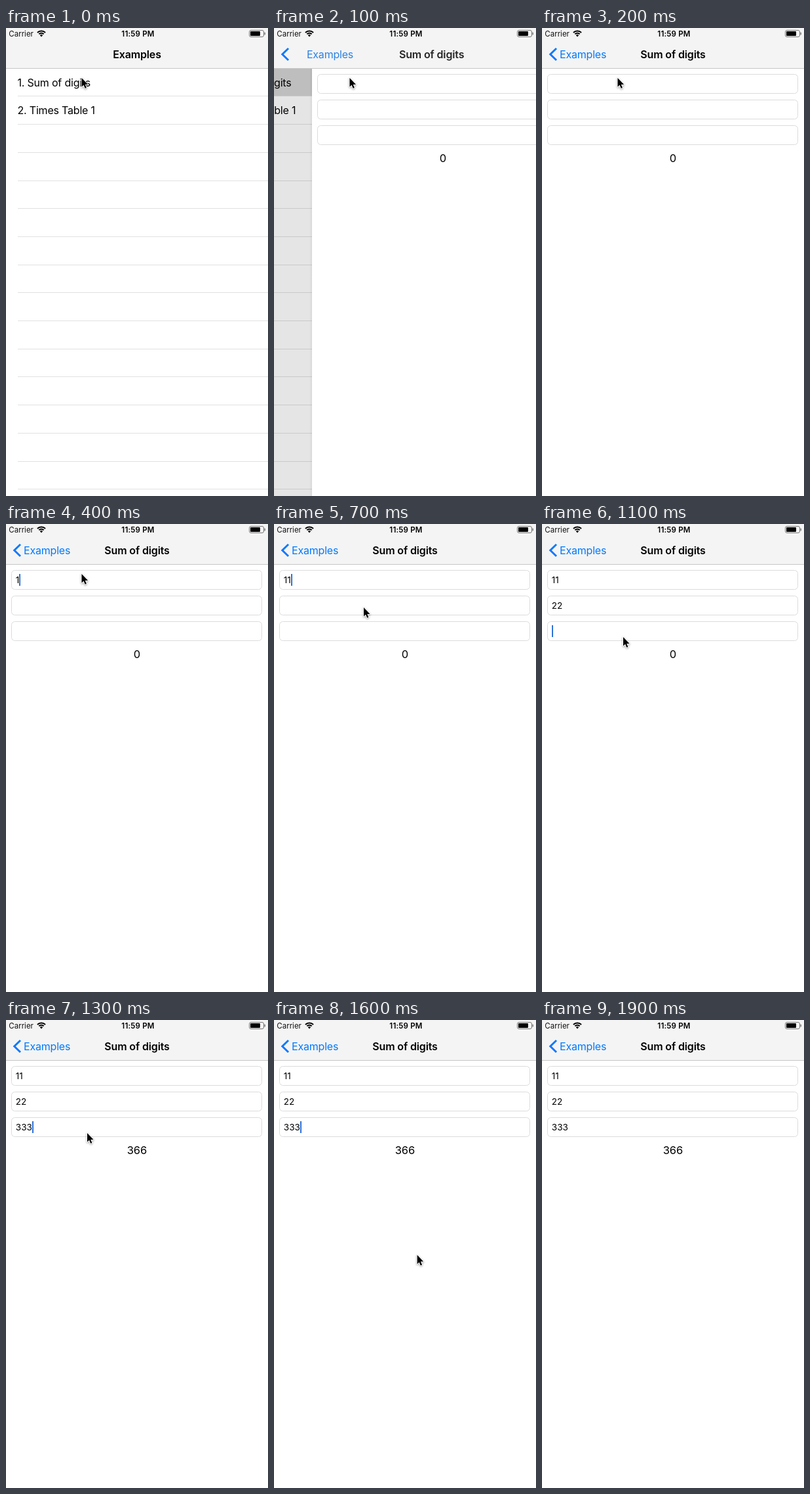
Animation, 400 px wide and 712 px high, one loop 2 s. Source, as an HTML page with a canvas:

```html
<!DOCTYPE html>
<html lang="en">
<head>
<meta charset="utf-8">
<title>Sum of digits</title>
<style>
  html, body { margin: 0; width: 100%; height: 100%; overflow: hidden; background: #fff; }
  canvas { display: block; width: 400px; height: 712px; }
</style>
</head>
<body>
<canvas id="stage"></canvas>
<script>
const W = 400, H = 712, LOOP = 2000, STEP = 100;
const BLUE = '#007aff', BAR_H = 61;
const FONT = 'Inter, Roboto, sans-serif';

const canvas = document.getElementById('stage');
const ctx = canvas.getContext('2d');
const ratio = window.devicePixelRatio || 1;
canvas.width = W * ratio;
canvas.height = H * ratio;

// Pointer stops: step, x, y
const pointerStops = [
  [0, 115.5, 76], [5, 115.5, 76], [7, 137, 127], [9, 137, 127],
  [11, 124, 172], [14, 124, 172], [18, 357, 629]
];

// Each field: top, step of focus, then typed values by step
const fields = [
  { top: 70, focus: 3, blur: 8, typed: [[4, '1'], [5, '11']] },
  { top: 109, focus: 8, blur: 11, typed: [[9, '2'], [10, '22']] },
  { top: 148, focus: 11, blur: 19, typed: [[12, '33'], [13, '333']] }
];

function text(str, x, y, size, opts = {}) {
  const { weight = 400, color = '#000', align = 'left', spacing = 0 } = opts;
  ctx.font = `${weight} ${size}px ${FONT}`;
  ctx.letterSpacing = spacing + 'px';
  ctx.textAlign = align;
  ctx.fillStyle = color;
  ctx.fillText(str, x, y);
  return ctx.measureText(str).width;
}

function rect(x, y, w, h, color) {
  ctx.fillStyle = color;
  ctx.fillRect(x, y, w, h);
}

function roundBox(x, y, w, h, r) {
  ctx.beginPath();
  ctx.roundRect(x, y, w, h, r);
}

function polyline(points) {
  ctx.beginPath();
  points.forEach(([x, y]) => ctx.lineTo(x, y));
}

function valueAt(field, step) {
  return field.typed.reduce((v, [at, str]) => step >= at ? str : v, '');
}

function pointerAt(step) {
  const last = pointerStops.length - 1;
  let i = 0;
  while (i < last - 1 && step >= pointerStops[i + 1][0]) i++;
  const [t0, x0, y0] = pointerStops[i];
  const [t1, x1, y1] = pointerStops[i + 1];
  let k = (step - t0) / (t1 - t0);
  if (i === last - 1) k = k ** 1.3;
  return [x0 + (x1 - x0) * k, y0 + (y1 - y0) * k];
}

function drawList(progress) {
  const shift = -120 * progress;
  ctx.save();
  ctx.translate(shift, 0);
  if (progress > 0) rect(0, BAR_H, W, 42, '#d4d4d4');
  for (let i = 0; i < 15; i++) {
    rect(18, Math.round(103.4 + 42.7 * i), W - 18, 1, '#e1e1e1');
  }
  text('1. Sum of digits', 17.5, 88.5, 16, { spacing: -0.2 });
  text('2. Times Table 1', 17.5, 131, 16, { spacing: -0.2 });
  ctx.restore();
  if (progress > 0) rect(0, BAR_H, W, H, `rgba(0,0,0,${0.12 * progress})`);
}

function drawField(field, step) {
  const { top, focus, blur } = field;
  roundBox(8.5, top + 0.5, 382, 29, 5);
  ctx.strokeStyle = '#dcdcdc';
  ctx.lineWidth = 1;
  ctx.stroke();
  const value = valueAt(field, step);
  const width = text(value, 14.8, top + 19.8, 13.5);
  if (step >= focus && step < blur) {
    rect(Math.round(15 + Math.max(0, width - 0.3)), top + 6, 2, 18, '#2f72d6');
  }
}

function drawForm(progress, step) {
  const left = W * (1 - progress);
  ctx.save();
  ctx.translate(left, 0);
  if (left > 0) {
    const shade = ctx.createLinearGradient(-4, 0, 0, 0);
    shade.addColorStop(0, 'rgba(0,0,0,0)');
    shade.addColorStop(1, 'rgba(0,0,0,0.06)');
    rect(-4, BAR_H, 4, H, shade);
  }
  rect(0, BAR_H, W, H, '#fff');
  fields.forEach(f => drawField(f, step));
  const values = fields.map(f => valueAt(f, step));
  const total = values.every(Boolean) ? values.reduce((sum, v) => sum + Number(v), 0) : 0;
  text(String(total), 200, 203.5, 16.5, { align: 'center' });
  ctx.restore();
}

function drawStatus() {
  text('Carrier', 4.3, 13, 11.5, { color: '#111' });
  text('11:59 PM', 201.5, 13, 11.5, { weight: 600, align: 'center', spacing: 0.2 });

  ctx.strokeStyle = '#000';
  ctx.lineWidth = 2;
  for (const r of [5.2, 8.6]) {
    ctx.beginPath();
    ctx.arc(54, 13, r, -Math.PI * 0.75, -Math.PI * 0.25);
    ctx.stroke();
  }
  ctx.beginPath();
  ctx.moveTo(54, 13.4);
  ctx.arc(54, 13, 3, -Math.PI * 0.75, -Math.PI * 0.25);
  ctx.fillStyle = '#000';
  ctx.fill();

  roundBox(371.5, 3.5, 22, 10, 2.5);
  ctx.strokeStyle = '#777';
  ctx.lineWidth = 1;
  ctx.stroke();
  roundBox(373, 5, 15, 7, 1);
  ctx.fill();
  roundBox(394.5, 6.5, 1.5, 4, [0, 1, 1, 0]);
  ctx.fillStyle = '#777';
  ctx.fill();
}

function drawBar(progress) {
  rect(0, 0, W, BAR_H, '#f4f4f4');
  rect(0, BAR_H, W, 1, '#c6c6c6');
  drawStatus();
  const title = { weight: 600, align: 'center', spacing: -0.15 };
  if (progress === 0) {
    text('Examples', 200, 45.5, 16, title);
    return;
  }
  const rest = 1 - progress;
  polyline([[22, 31], [12.7, 40], [22, 49]]);
  ctx.strokeStyle = BLUE;
  ctx.lineWidth = 2.9;
  ctx.stroke();
  ctx.globalAlpha = 1 - rest;
  text('Examples', 27 + 158 * rest, 45.5, 16, {
    color: rest > 0 ? '#0b6fe0' : BLUE, spacing: -0.2
  });
  text('Sum of digits', 200 + 280 * rest, 45.5, 16, title);
  ctx.globalAlpha = 1;
}

function drawPointer(step) {
  const [x, y] = pointerAt(step);
  ctx.save();
  ctx.translate(x, y);
  polyline([[0, 0], [0, 13.6], [3.1, 10.8], [5.2, 15.8], [7.4, 14.9], [5.3, 10], [9.6, 10]]);
  ctx.closePath();
  ctx.lineJoin = 'round';
  ctx.shadowColor = 'rgba(0,0,0,0.4)';
  ctx.shadowBlur = 3 * ratio;
  ctx.shadowOffsetY = ratio;
  ctx.strokeStyle = '#fff';
  ctx.lineWidth = 1.8;
  ctx.stroke();
  ctx.shadowColor = 'transparent';
  ctx.fillStyle = '#000';
  ctx.fill();
  ctx.restore();
}

function render(time) {
  const step = Math.floor((time % LOOP) / STEP);
  const progress = step === 0 ? 0 : step === 1 ? 0.855 : 1;
  ctx.setTransform(ratio, 0, 0, ratio, 0, 0);
  rect(0, 0, W, H, '#fff');
  if (progress < 1) drawList(progress);
  if (progress > 0) drawForm(progress, step);
  drawBar(progress);
  if (step < 19) drawPointer(step);
}

const start = performance.now();
function tick() {
  render(performance.now() - start);
  requestAnimationFrame(tick);
}
tick();
</script>
</body>
</html>
```
